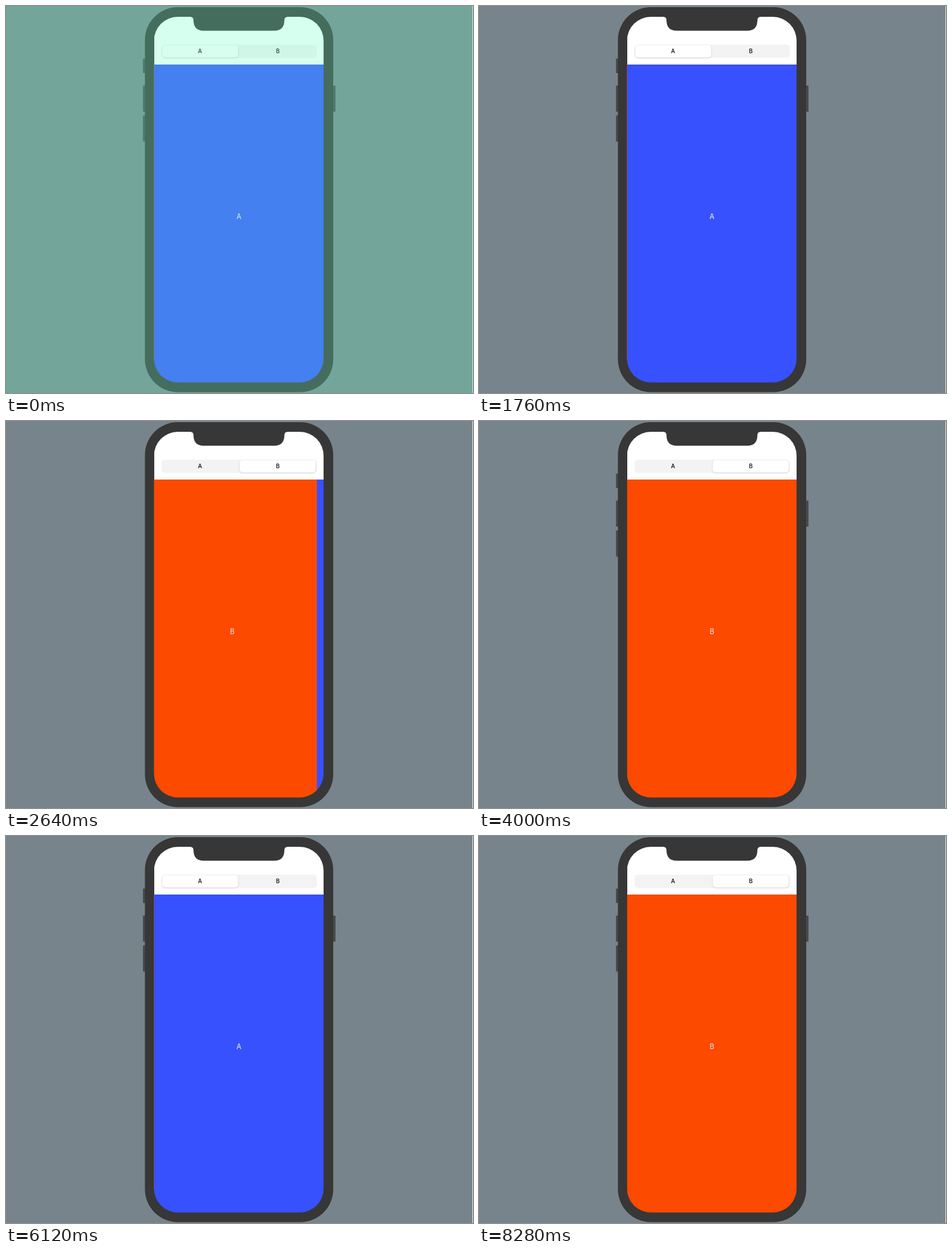
These frames come from a looping animation (822x681 px, 8.32 s). An HTML page:

```html
<!DOCTYPE html>
<html lang="en">
<head>
<meta charset="utf-8">
<title>Segmented pages</title>
<style>
  html, body { margin: 0; width: 822px; height: 681px; overflow: hidden; background: #77848c; }
  svg { display: block; }
  text { font-family: Inter, sans-serif; text-anchor: middle; }
  .tab { font-size: 9.8px; font-weight: 500; }
  .label { font-size: 12.4px; }
  #thumb { filter: drop-shadow(0 1px 1.5px rgba(0, 0, 0, .16)); }
</style>
</head>
<body>
<svg width="822" height="681" viewBox="0 0 822 681">
  <defs>
    <clipPath id="screen"><rect x="260.5" y="19" width="298.5" height="643.5" rx="42"/></clipPath>
  </defs>
  <rect width="822" height="681" fill="#77848c"/>
  <rect x="821" width="1" height="681" fill="#eceff0"/>

  <g id="buttons" fill="#4a4a4a">
    <rect x="241" y="92.5" width="5" height="25.5" rx="1"/>
    <rect x="241" y="140" width="5" height="46" rx="1"/>
    <rect x="241" y="192.5" width="5" height="46" rx="1"/>
    <rect x="575" y="140" width="5" height="46" rx="1"/>
  </g>
  <rect x="244.5" y="2" width="331.5" height="677.5" rx="58" fill="#373737"/>

  <g clip-path="url(#screen)">
    <rect x="261" y="19" width="298" height="84" fill="#fff"/>
    <g id="pageA">
      <rect x="260.5" y="103" width="298.5" height="560" fill="#3751ff"/>
      <text class="label" x="410" y="374.7" fill="#f6f6e4">A</text>
    </g>
    <g id="pageB">
      <rect x="260.5" y="103" width="298.5" height="560" fill="#fc4a00"/>
      <text class="label" x="410" y="374.7" fill="#dde9ee">B</text>
    </g>
  </g>
  <path fill="#373737" d="M324 18V19Q330 19 330 25Q330 43.500 348 43.500H472Q490 43.500 490 25Q490 19 496 19V18Z"/>

  <rect x="274" y="68" width="273" height="23.500" rx="6" fill="#f3f3f3"/>
  <rect id="thumb" x="275" y="69" width="133.500" height="21.500" rx="5" fill="#fff"/>
  <text class="tab" x="341.500" y="83.300">A</text>
  <text class="tab" x="478.500" y="83.300">B</text>

  <rect id="tint" width="822" height="681" fill="#6affc3"/>
</svg>
<script>
  const LOOP = 8320, WIDTH = 298, SLIDE = 350;
  const TAPS = [
    { at: 2340, to: 1 },
    { at: 4325, to: 0 },
    { at: 6525, to: 1 },
  ];
  const $ = id => document.getElementById(id);
  const clamp = v => Math.min(1, Math.max(0, v));
  const easeInOut = u => u < .5 ? 2 * u * u : 1 - 2 * (1 - u) ** 2;
  const easeOut = u => 1 - (1 - u) ** 3;
  const shift = (id, x) => $(id).setAttribute('transform', `translate(${x.toFixed(2)} 0)`);

  // 0 = page A, 1 = page B
  function selection(t, lead, duration, ease) {
    let value = 0;
    for (const { at, to } of TAPS) {
      value += (to - value) * ease(clamp((t - at + lead) / duration));
    }
    return value;
  }

  function buttonOpacity(t) {
    let opacity = 1;
    for (const { at, to } of TAPS) {
      if (to && t >= at + 100) opacity = clamp((t - at - 740) / 300);
      if (!to && t >= at) opacity = 1;
    }
    return opacity;
  }

  function render(t) {
    const page = selection(t, 0, SLIDE, easeInOut);
    shift('pageA', WIDTH * page);
    shift('pageB', WIDTH * (page - 1));
    shift('thumb', 136.5 * selection(t, 50, 230, easeOut));
    $('buttons').setAttribute('opacity', buttonOpacity(t));
    $('tint').setAttribute('opacity', .27 * clamp(1 - (t - 40) / 360));
  }

  const start = performance.now();
  function tick() {
    render((performance.now() - start) % LOOP);
    requestAnimationFrame(tick);
  }
  tick();
</script>
</body>
</html>
```
